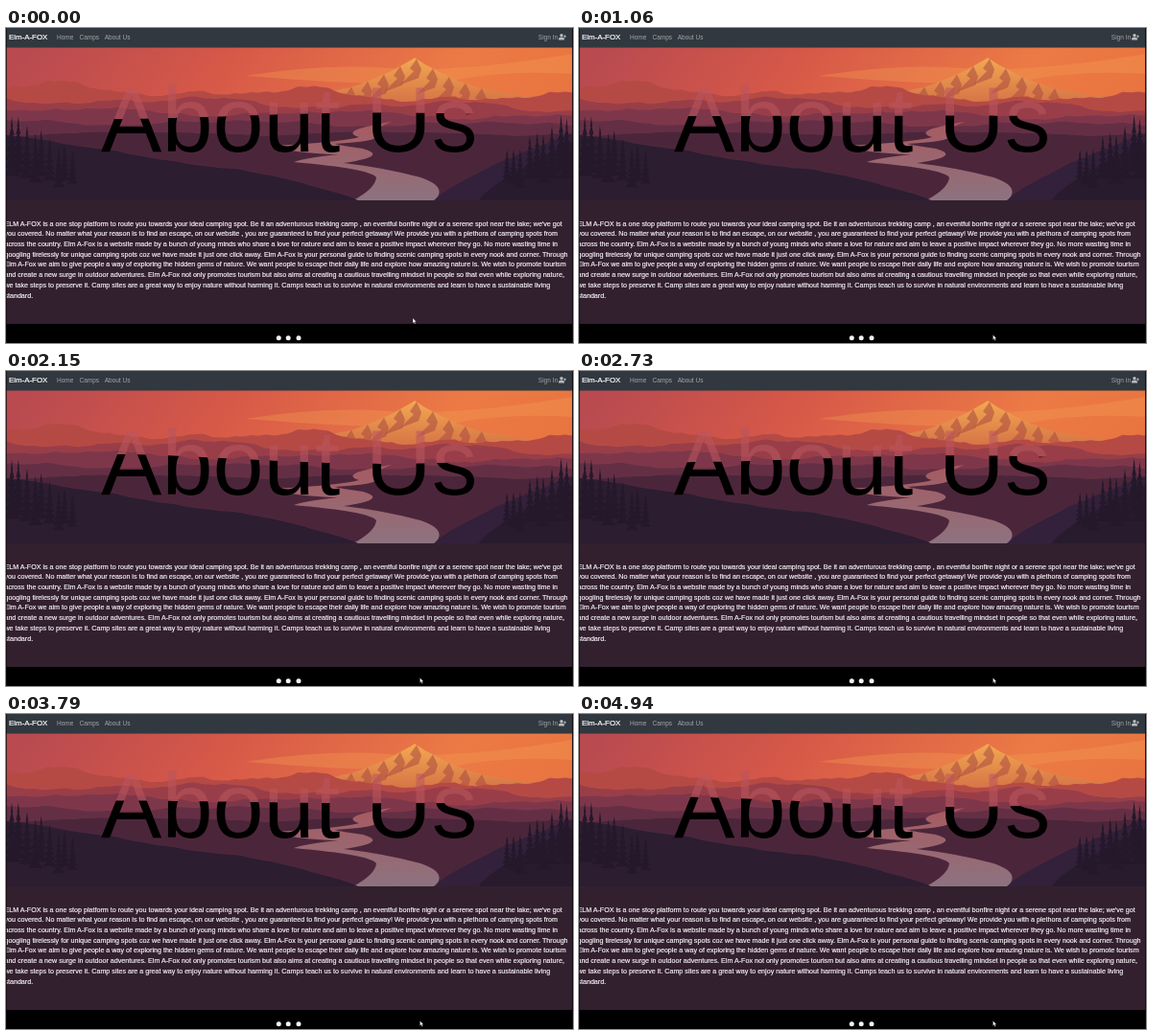
Animation, 591 px wide and 329 px high, one loop 4970 ms. Source, as an HTML page:

```html
<!DOCTYPE html>
<html lang="en">
<head>
<meta charset="utf-8">
<title>About Us</title>
<style>
  html, body { margin: 0; width: 100%; height: 100%; overflow: hidden; background: #33202f; }
  svg { display: block; width: 591px; height: 329px; font-family: "Liberation Sans", Arial, sans-serif; }
  text { white-space: pre; }
  .nav { font-size: 6.5px; fill: #a3a6a9; }
  .brand { font-size: 7.9px; fill: #fff; stroke: #fff; stroke-width: .2; }
  .copy { font-size: 7.15px; fill: #f5f2f4; stroke: #f5f2f4; stroke-width: .18; }
  .title { font-size: 95.5px; }
</style>
</head>
<body>
<svg viewBox="0 0 591 329">
  <defs>
    <linearGradient id="sky" x1="0" y1=".2" x2="1" y2=".4">
      <stop offset="0" stop-color="#b84a50"/>
      <stop offset=".35" stop-color="#d65848"/>
      <stop offset=".75" stop-color="#ec7a45"/>
      <stop offset="1" stop-color="#e8743f"/>
    </linearGradient>
    <linearGradient id="peak" x1="0" y1="0" x2="0" y2=".5">
      <stop offset="0" stop-color="#f4a852"/>
      <stop offset="1" stop-color="#c2553f"/>
    </linearGradient>
    <linearGradient id="river" x1="0" y1="0" x2="0" y2="1">
      <stop offset="0" stop-color="#a85a60"/>
      <stop offset="1" stop-color="#8c7380"/>
    </linearGradient>
    <clipPath id="banner"><rect y="20" width="591" height="160"/></clipPath>
    <clipPath id="water"><path id="wave"/></clipPath>
  </defs>

  <rect width="591" height="329" fill="#33202f"/>
  <g id="scene" clip-path="url(#banner)"></g>

  <text class="title" x="98.7" y="128.5" fill="#b9565f" fill-opacity=".55">About Us</text>
  <text class="title" x="98.7" y="128.5" clip-path="url(#water)">About Us</text>

  <rect width="591" height="20.5" fill="#31383f"/>
  <text class="brand" x="3" y="12">Elm-A-FOX</text>
  <g class="nav">
    <text x="53" y="11.8">Home</text>
    <text x="76.5" y="11.8">Camps</text>
    <text x="102.7" y="11.8">About Us</text>
    <text x="554.8" y="11.8">Sign In</text>
  </g>
  <g fill="#b9bbbd">
    <circle cx="579" cy="7.8" r="1.7"/>
    <path d="M576 12.5v-1q0-1.8 1.8-1.8h2.4q1.8 0 1.8 1.8v1z"/>
    <path d="M581 8.8h3M582.5 7.3v3" stroke="#b9bbbd" stroke-width=".8"/>
  </g>

  <g class="copy" id="copy"></g>

  <rect y="309" width="591" height="20" fill="#000"/>
  <g fill="#f2f2f2">
    <circle cx="284.3" cy="323.8" r="2.5"/>
    <circle cx="294.2" cy="323.8" r="2.5"/>
    <circle cx="305" cy="323.8" r="2.5"/>
  </g>
  <path d="M.3 0V329M590.5 0V329" stroke="#100b10" stroke-width=".9"/>
  <path id="cursor" d="M0 0V5.2L1.2 4.1 2 5.9 2.9 5.5 2.1 3.8H3.7Z" fill="#fff" stroke="#222" stroke-width=".3"/>
</svg>

<script>
const byId = id => document.getElementById(id);

const lines = [
  "ELM A-FOX is a one stop platform to route you towards your ideal camping spot. Be it an adventurous trekking camp , an eventful bonfire night or a serene spot near the lake; we've got",
  "you covered. No matter what your reason is to find an escape, on our website , you are guaranteed to find your perfect getaway! We provide you with a plethora of camping spots from",
  "across the country. Elm A-Fox is a website made by a bunch of young minds who share a love for nature and aim to leave a positive impact wherever they go. No more wasting time in",
  "googling tirelessly for unique camping spots coz we have made it just one click away. Elm A-Fox is your personal guide to finding scenic camping spots in every nook and corner. Through",
  "Elm A-Fox we aim to give people a way of exploring the hidden gems of nature. We want people to escape their daily life and explore how amazing nature is. We wish to promote tourism",
  "and create a new surge in outdoor adventures. Elm A-Fox not only promotes tourism but also aims at creating a cautious travelling mindset in people so that even while exploring nature,",
  "we take steps to preserve it. Camp sites are a great way to enjoy nature without harming it. Camps teach us to survive in natural environments and learn to have a sustainable living",
  "standard."
];
byId("copy").innerHTML = lines
  .map((line, i) => `<text x="-1.6" y="${206.6 + i * 10.7}">${line}</text>`).join("");

const WIDTH = 591, BOTTOM = 181;
const range = (n, make) => Array.from({ length: n }, (_, i) => make(i));
const shape = (fill, d, opacity = 1) => `<path d="${d}" fill="${fill}" opacity="${opacity}"/>`;

// Sharp-topped noise between 0 and 1.
function crags(x, seed) {
  let sum = 0;
  for (let k = 0; k < 5; k++) sum += (1 - Math.abs(Math.sin(x * .012 * 2 ** k + seed * (k + 1.3)))) / 2 ** k;
  return sum / 1.94;
}

// Fills everything below the skyline given by heightAt(x).
function terrain(fill, heightAt) {
  const skyline = range(198, i => `L${i * 3} ${heightAt(i * 3).toFixed(1)}`).join("");
  return shape(fill, `M0 ${BOTTOM}${skyline}V${BOTTOM}Z`);
}

const summit = x => 31 + 46 * (1 - Math.exp(-Math.abs(x - 426) / 70)) + 5 * (crags(426, 1) - crags(x, 1));

function facet(i) {
  const x = 360 + i * 17;
  return shape("#a94a40", `M${x} ${summit(x)}l-7 10 4 3 -14 14 19 -7 3 -9Z`, .55);
}

function farRidge(i) {
  const depth = i / 4;
  const fill = `hsl(${363 - 38 * depth} ${45 - 12 * depth}% ${49 - 27 * depth}%)`;
  return terrain(fill, x => 69 + 11 * i + x * .022 * (1 - depth) - (20 - 3 * i) * crags(x, i + 2));
}

// A dark bank that climbs from the shore to the given side of the picture.
function bank(fill, shore, edge, rise, seed) {
  return terrain(fill, x => {
    const climb = Math.max(0, (x - shore) / (edge - shore));
    return BOTTOM - rise * climb ** .75 - 6 * crags(x, seed) * Math.min(1, climb * 4);
  });
}

function tree(x, top, height) {
  const tiers = range(7, i => {
    const y = top + height * i / 8, w = 1.2 + height * .02 * i;
    return `M${x} ${y - 2}l${w} ${height / 6}h${-2 * w}Z`;
  });
  return shape("#24182a", tiers.join(""));
}

function grove(edge, direction, seed) {
  return range(9, i => {
    const sway = crags(i * 83, seed);
    return tree(edge + direction * (i * 8 + 5 * sway), 86 + i * 5 + 20 * sway, 68 - i * 4);
  }).join("");
}

byId("scene").innerHTML = [
  `<rect y="20" width="591" height="160" fill="url(#sky)"/>`,
  shape("#f39a50", "M250 50Q330 37 400 42T591 27V48Q520 44 470 54T250 50Z", .35),
  terrain("url(#peak)", summit),
  ...range(9, facet),
  ...range(5, farRidge),
  shape("url(#river)", "M402 98Q345 107 368 114Q345 120 276 123Q300 131 346 132Q310 136 300 140Q380 147 386 156Q385 168 360 181H446Q462 166 432 156Q395 146 352 141Q400 134 372 126Q350 123 342 121Q398 118 384 110Q380 106 402 98Z"),
  bank("#33203a", 446, WIDTH, 68, 4),
  bank("#2c1d31", 368, 0, 66, 7),
  bank("#291b2e", 492, WIDTH, 58, 9),
  grove(4, 1, 3),
  grove(WIDTH - 4, -1, 5)
].join("");

const LOOP = 4970, SWELL = 1405, CREST = 650;

function draw(now) {
  const t = now % LOOP;
  const rise = (1 + Math.cos(2 * Math.PI * (t - CREST) / SWELL)) / 2;
  const swing = -3.5 + 9 * rise;
  const waterline = range(82, i => `${90 + i * 5} ${91.8 - swing * Math.cos(Math.PI * i / 61)}`);
  byId("wave").setAttribute("d", `M${waterline.join("L")}V140H90Z`);

  const move = Math.min(t / 500, 1);
  byId("cursor").setAttribute("transform", `translate(${424 + 7.5 * move} ${303 + 17.5 * move})`);
  requestAnimationFrame(() => draw(performance.now()));
}
draw(0);
</script>
</body>
</html>
```
